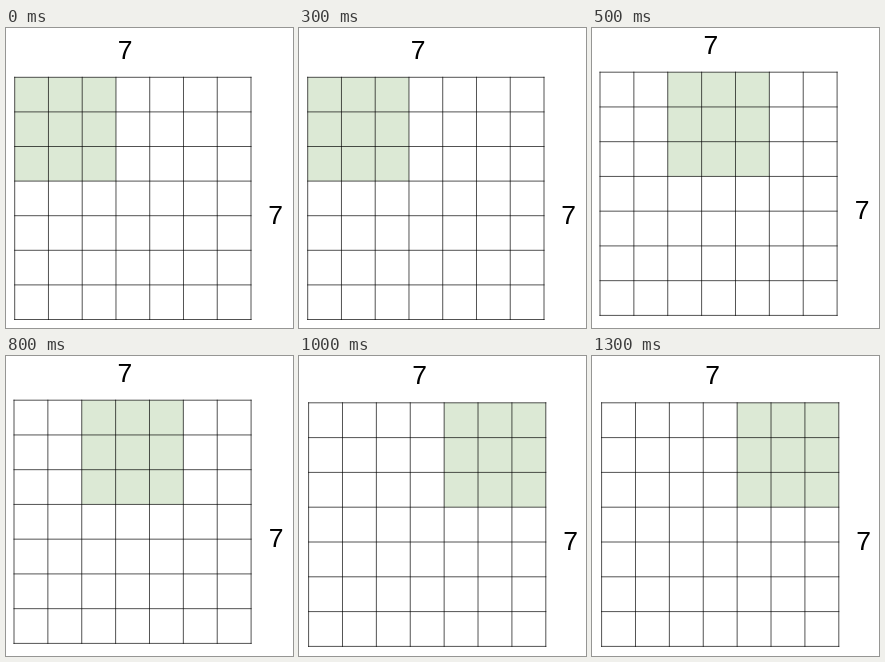
Animation, 287 px wide and 300 px high, one loop 1500 ms. Source, as an HTML page with a canvas:

```html
<!DOCTYPE html>
<html>
<head>
<meta charset="utf-8">
<style>
  html, body { margin: 0; width: 100%; height: 100%; overflow: hidden; background: #fff; }
  canvas { display: block; }
</style>
</head>
<body>
<canvas id="stage" width="287" height="300"></canvas>
<script>
const ctx = document.getElementById('stage').getContext('2d');
const CELLS = 7, WINDOW = 3, STEP_MS = 500;

// The 3x3 window slides two columns per step; the grid shifts slightly each time.
const poses = [
  { col: 0, left: 8.7, top: 49.3, right: 245, bottom: 291.5, topLabel: [119.2, 31], sideLabel: [269.5, 196] },
  { col: 2, left: 8, top: 44.2, right: 245.1, bottom: 287.4, topLabel: [118.8, 26], sideLabel: [270, 191] },
  { col: 4, left: 9.6, top: 46.8, right: 246.8, bottom: 290.4, topLabel: [120.6, 28], sideLabel: [271.7, 194] }
];

function draw({ col, left, top, right, bottom, topLabel, sideLabel }) {
  const cellW = (right - left) / CELLS, cellH = (bottom - top) / CELLS;

  ctx.fillStyle = '#fff';
  ctx.fillRect(0, 0, 287, 300);
  ctx.fillStyle = '#dce9d5';
  ctx.fillRect(left + col * cellW, top, WINDOW * cellW, WINDOW * cellH);

  ctx.beginPath();
  for (let i = 0; i <= CELLS; i++) {
    const x = left + i * cellW, y = top + i * cellH;
    ctx.moveTo(x, top);
    ctx.lineTo(x, bottom);
    ctx.moveTo(left, y);
    ctx.lineTo(right, y);
  }
  ctx.strokeStyle = 'rgba(0, 0, 0, 0.68)';
  ctx.lineWidth = 1;
  ctx.lineCap = 'square';
  ctx.stroke();

  ctx.fillStyle = '#000';
  ctx.font = '26.5px "Liberation Sans", Arial, sans-serif';
  ctx.textAlign = 'center';
  ctx.fillText(CELLS, ...topLabel);
  ctx.fillText(CELLS, ...sideLabel);
}

function tick() {
  draw(poses[Math.floor(performance.now() / STEP_MS) % poses.length]);
  requestAnimationFrame(tick);
}
tick();
</script>
</body>
</html>
```
